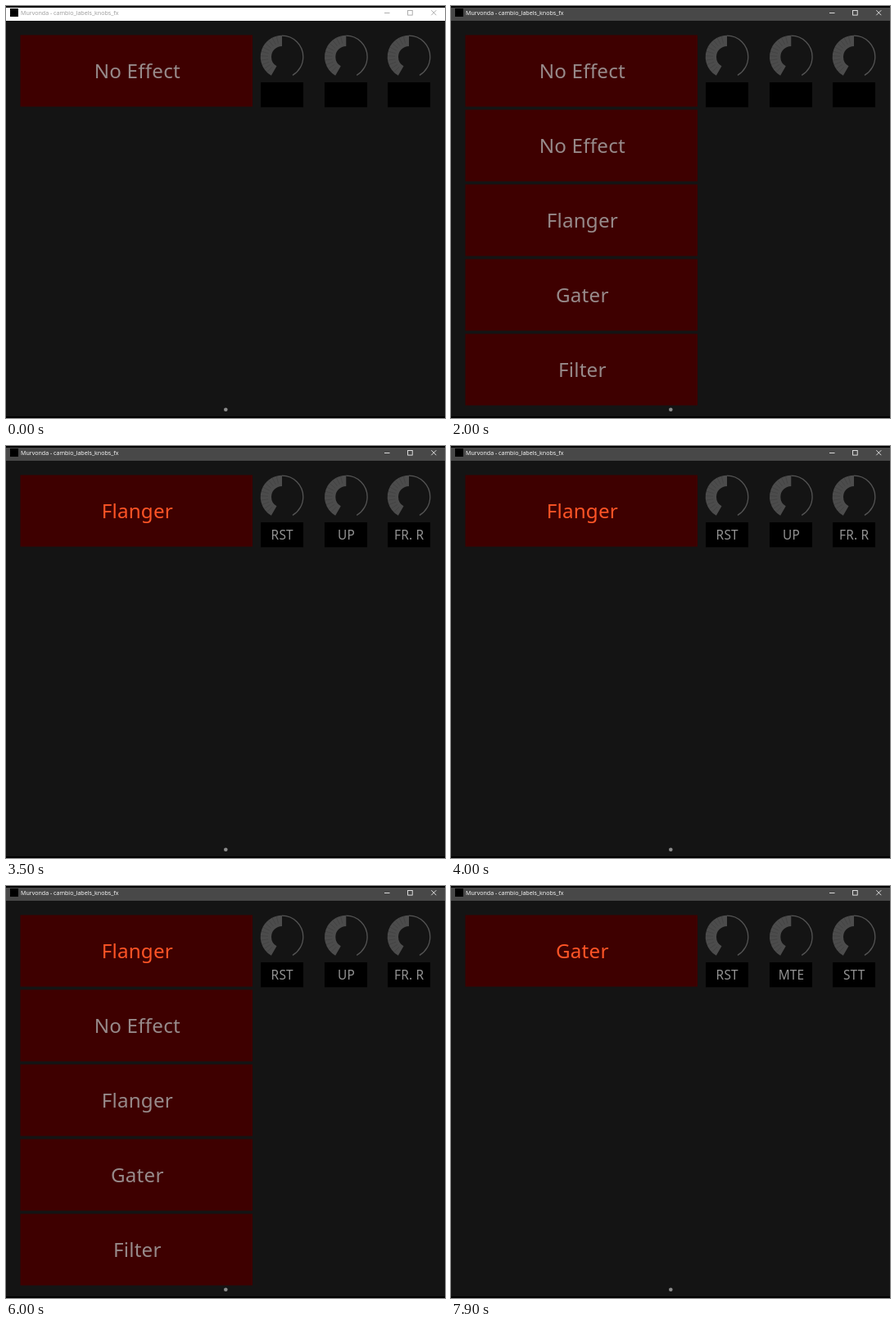
These frames come from a looping animation (536x502 px, 8 s). An HTML page with a canvas:

```html
<!DOCTYPE html>
<html lang="en">
<head>
<meta charset="utf-8">
<title>Effect selector</title>
<style>
  html, body { margin: 0; width: 100%; height: 100%; overflow: hidden; background: #000; }
  canvas { display: block; }
</style>
</head>
<body>
<canvas id="stage" width="536" height="502"></canvas>
<script>
const ctx = document.getElementById('stage').getContext('2d');
const LOOP = 8000;
const EFFECTS = ['No Effect', 'Flanger', 'Gater', 'Filter'];
const KNOBS = [337, 415.3, 492];
const STATES = [
  { at: 0, effect: 'No Effect', open: false, focused: false, labels: [] },
  { at: 2000, effect: 'No Effect', open: true, focused: true, labels: [] },
  { at: 3500, effect: 'Flanger', open: false, focused: true, labels: ['RST', 'UP', 'FR. R'] },
  { at: 5600, effect: 'Flanger', open: true, focused: true, labels: ['RST', 'UP', 'FR. R'] },
  { at: 7600, effect: 'Gater', open: false, focused: true, labels: ['RST', 'MTE', 'STT'] }
];

function rect(x, y, w, h, color) {
  ctx.fillStyle = color;
  ctx.fillRect(x, y, w, h);
}

function text(str, x, y, size, color, { family = 'Noto Sans', align = 'center', spacing = 0 } = {}) {
  ctx.font = `${size}px "${family}", sans-serif`;
  ctx.textAlign = align;
  ctx.letterSpacing = `${spacing}px`;
  ctx.fillStyle = color;
  ctx.fillText(str, x, y);
}

function line(x1, y1, x2, y2) {
  ctx.beginPath();
  ctx.moveTo(x1, y1);
  ctx.lineTo(x2, y2);
  ctx.stroke();
}

function titleBar(focused) {
  const ink = focused ? '#fff' : '#999';
  rect(0, 2, 536, 16, focused ? '#484848' : '#fff');
  rect(5, 3, 10, 10, '#000');
  text('Murvonda - cambio_labels_knobs_fx', 18, 11, 7.1, ink, { family: 'Open Sans', align: 'left' });
  ctx.strokeStyle = ink;
  ctx.lineWidth = 0.8;
  line(462, 8.5, 468.5, 8.5);
  ctx.strokeRect(490.6, 5.5, 5.6, 5.6);
  line(519.3, 5.2, 525.3, 11.2);
  line(525.3, 5.2, 519.3, 11.2);
}

function button(row, label, active) {
  const y = 35.4 + row * 91;
  rect(17.5, y, 283.5, 87.2, '#3e0000');
  text(label, 160.3, y + 52.8, 24.2, active ? '#ff5426' : '#978a8a', { spacing: 0.2 });
}

function knob(x, label) {
  const y = 62, top = -Math.PI / 2, start = Math.PI * 2 / 3;
  ctx.fillStyle = '#4c4c4c';
  ctx.beginPath();
  ctx.arc(x, y, 26.3, start, top + 2 * Math.PI);
  ctx.arc(x, y, 13, top + 2 * Math.PI, start, true);
  ctx.fill();
  ctx.strokeStyle = '#545454';
  ctx.lineWidth = 1.3;
  ctx.beginPath();
  ctx.arc(x, y, 25.8, top, Math.PI / 3);
  ctx.stroke();

  ctx.strokeStyle = '#404040';
  ctx.lineWidth = 0.7;
  for (let a = 2.35; a < 4.5; a += 0.21) {
    const c = Math.cos(a), s = Math.sin(a);
    line(x + 17 * c, y + 17 * s, x + 26 * c, y + 26 * s);
  }

  rect(Math.round(x - 26), 93, 52, 30.3, '#000');
  if (label) text(label, x + 0.2, 114, 15.4, '#939393', { spacing: 0.2 });
}

function draw(time) {
  const state = STATES.findLast(s => s.at <= time);
  rect(0, 0, 536, 502, '#000');
  rect(0, 2, 536, 498, '#141414');
  titleBar(state.focused);
  button(0, state.effect, state.effect !== 'No Effect');
  if (state.open) EFFECTS.forEach((name, i) => button(i + 1, name, false));
  KNOBS.forEach((x, i) => knob(x, state.labels[i]));
  ctx.fillStyle = '#8c8c8c';
  ctx.beginPath();
  ctx.arc(268.3, 491.7, 2.3, 0, 2 * Math.PI);
  ctx.fill();
}

const begin = performance.now();
function tick() {
  draw((performance.now() - begin) % LOOP);
  requestAnimationFrame(tick);
}
tick();
</script>
</body>
</html>
```
